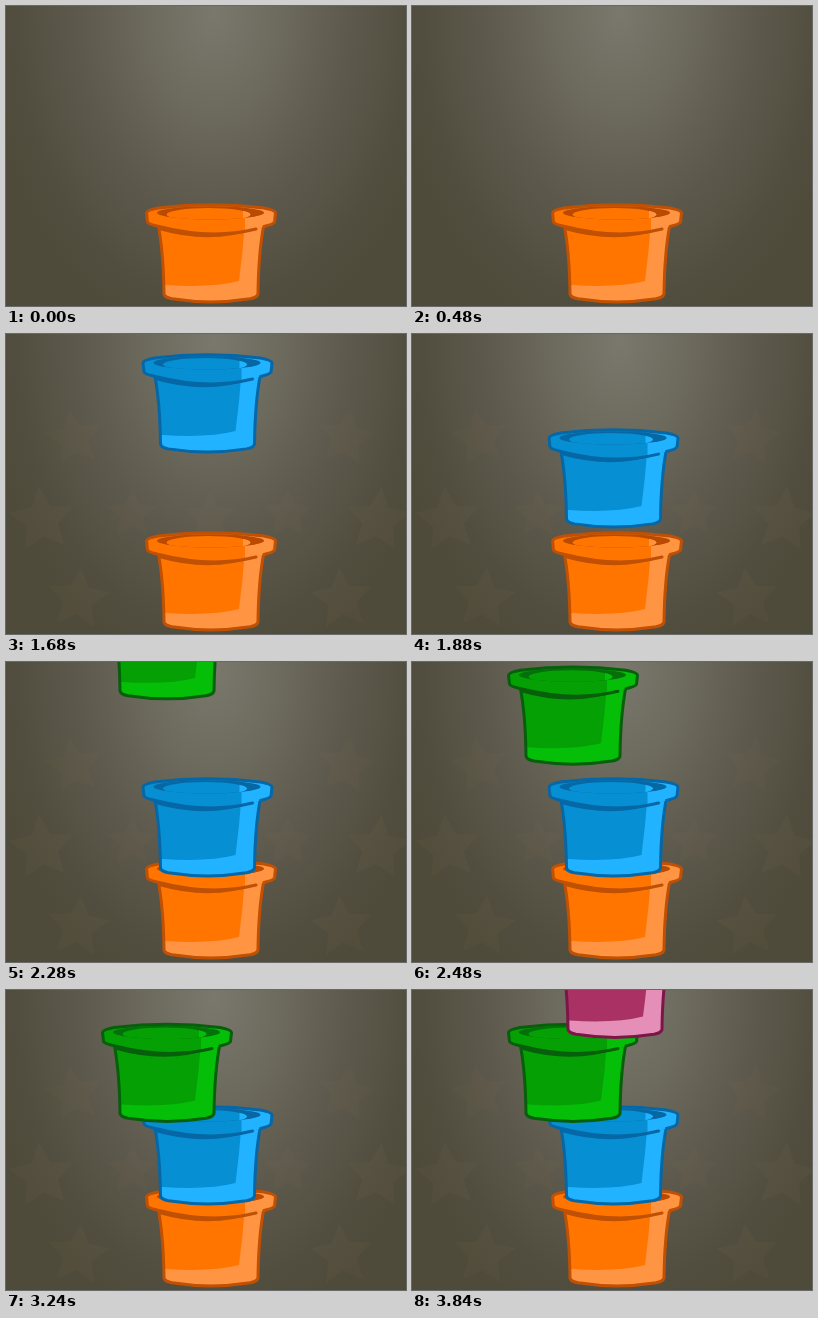
Write an HTML page with a canvas that moves like this. It is 400x300 px and loops after 3.88 s.

```html
<!DOCTYPE html>
<html lang="en">
<head>
<meta charset="utf-8">
<title>Bucket stack</title>
<style>
  html, body { margin: 0; width: 100%; height: 100%; overflow: hidden; background: #4f4b3b; }
  canvas { display: block; width: 100vw; height: 100vh; }
</style>
</head>
<body>
<canvas id="stage" width="400" height="300"></canvas>
<script>
const ctx = document.getElementById('stage').getContext('2d');
const LOOP = 3880, STEP = 40;

// Bucket parts, placed where the bottom bucket stands
const body = new Path2D('M152 218 Q157.500 246 158 288 Q159 291.500 166 292.800 Q205 299 244 292.800 Q251 291.500 252 288 Q252.500 246 258 218 Z');
const face = new Path2D('M150 216 H239 Q237 245 233 275 Q206 282 160 279 L150 279 Z');
// Left open so that the lit side of the rim runs into the body
const rim = new Path2D('M258 220.500 Q267 218.500 268.500 216 L269.500 207 Q269 204 258 202 Q205 195.500 152 202 Q141 204 140.500 207 L141.500 216 Q143 218.500 153 220.500 Q205 234 250 223');
const crease = new Path2D('M152 220 Q205 233 250 223 Q205 239 153 224 Z');
const mouth = new Path2D();
mouth.ellipse(204.5, 206.8, 53.5, 6.6, 0, 0, Math.PI * 2);
const floor = new Path2D();
floor.ellipse(202.5, 208.5, 42, 6.5, 0, 0, Math.PI * 2);

const orange = { face: '#ff7500', light: '#ff9442', line: '#c05003', deep: '#b94a00' };
const blue = { face: '#068fd2', light: '#21b3ff', line: '#0567a6', deep: '#0568a5' };
const green = { face: '#05a004', light: '#04be08', line: '#075f0b', deep: '#04700a' };
const pink = { face: '#a93163', light: '#e58fb8', line: '#7d1648', deep: '#841b4e' };

const drops = [
  { color: blue, x: -3.5, rest: -82, start: 1320, lead: 0 },
  { color: green, x: -44, rest: -164.5, start: 2165, lead: 20 },
  { color: pink, x: -2, rest: -247, start: 3691, lead: 20 }
];

function fill(path, color) {
  ctx.fillStyle = color;
  ctx.fill(path);
}

function outline(path, color) {
  ctx.strokeStyle = color;
  ctx.lineWidth = 3;
  ctx.lineJoin = ctx.lineCap = 'round';
  ctx.stroke(path);
}

function clipped(path, paint) {
  ctx.save();
  ctx.clip(path);
  paint();
  ctx.restore();
}

function bucket(x, y, c) {
  ctx.save();
  ctx.translate(x, y);
  fill(body, c.light);
  clipped(body, () => fill(face, c.face));
  outline(body, c.line);
  fill(rim, c.face);
  clipped(rim, () => {
    ctx.fillStyle = c.light;
    ctx.fillRect(239, 195, 35, 35);
  });
  fill(mouth, c.deep);
  clipped(mouth, () => {
    fill(floor, c.face);
    clipped(floor, () => {
      ctx.fillStyle = c.light;
      ctx.fillRect(237, 195, 30, 30);
    });
  });
  fill(crease, c.line);
  outline(rim, c.line);
  ctx.restore();
}

function star(x, y, r, turn) {
  ctx.beginPath();
  for (let i = 0; i < 10; i++) {
    const a = turn - Math.PI / 2 + i * Math.PI / 5;
    const d = i % 2 ? r * 0.48 : r;
    ctx.lineTo(x + d * Math.cos(a), y + d * Math.sin(a));
  }
  ctx.fill();
}

function backdrop(t) {
  ctx.save();
  ctx.translate(208, 0);
  ctx.scale(0.68, 1);
  const g = ctx.createRadialGradient(0, 8, 0, 0, 8, 340);
  g.addColorStop(0, '#7a776c');
  g.addColorStop(0.3, '#6c695d');
  g.addColorStop(0.6, '#5c584b');
  g.addColorStop(0.85, '#524e3f');
  g.addColorStop(1, '#4f4b3b');
  ctx.fillStyle = g;
  ctx.fillRect(-310, 0, 600, 300);
  ctx.restore();
  if (t < 1320) return;
  ctx.fillStyle = 'rgba(125, 117, 78, 0.08)';
  star(204, 183, 27, 0);
  for (const side of [-1, 1]) {
    star(204 + side * 168, 186, 34, side * 0.1);
    star(204 + side * 136, 104, 30, side * 0.15);
    star(204 + side * 132, 265, 32, side * -0.1);
    star(204 + side * 78, 180, 26, 0);
  }
}

// Offset of a falling bucket from the bottom one, slightly accelerating
const fall = s => -293 + 0.284 * s + 9.9e-5 * s * s;

function draw(t) {
  backdrop(t);
  bucket(0, 0, orange);
  for (const d of drops) {
    const s = t - d.start;
    if (s >= -d.lead) bucket(d.x, Math.min(d.rest, fall(s)), d.color);
  }
}

const begin = performance.now();
function tick() {
  const t = (performance.now() - begin) % LOOP;
  draw(Math.floor(t / STEP) * STEP);
  requestAnimationFrame(tick);
}
tick();
</script>
</body>
</html>
```
